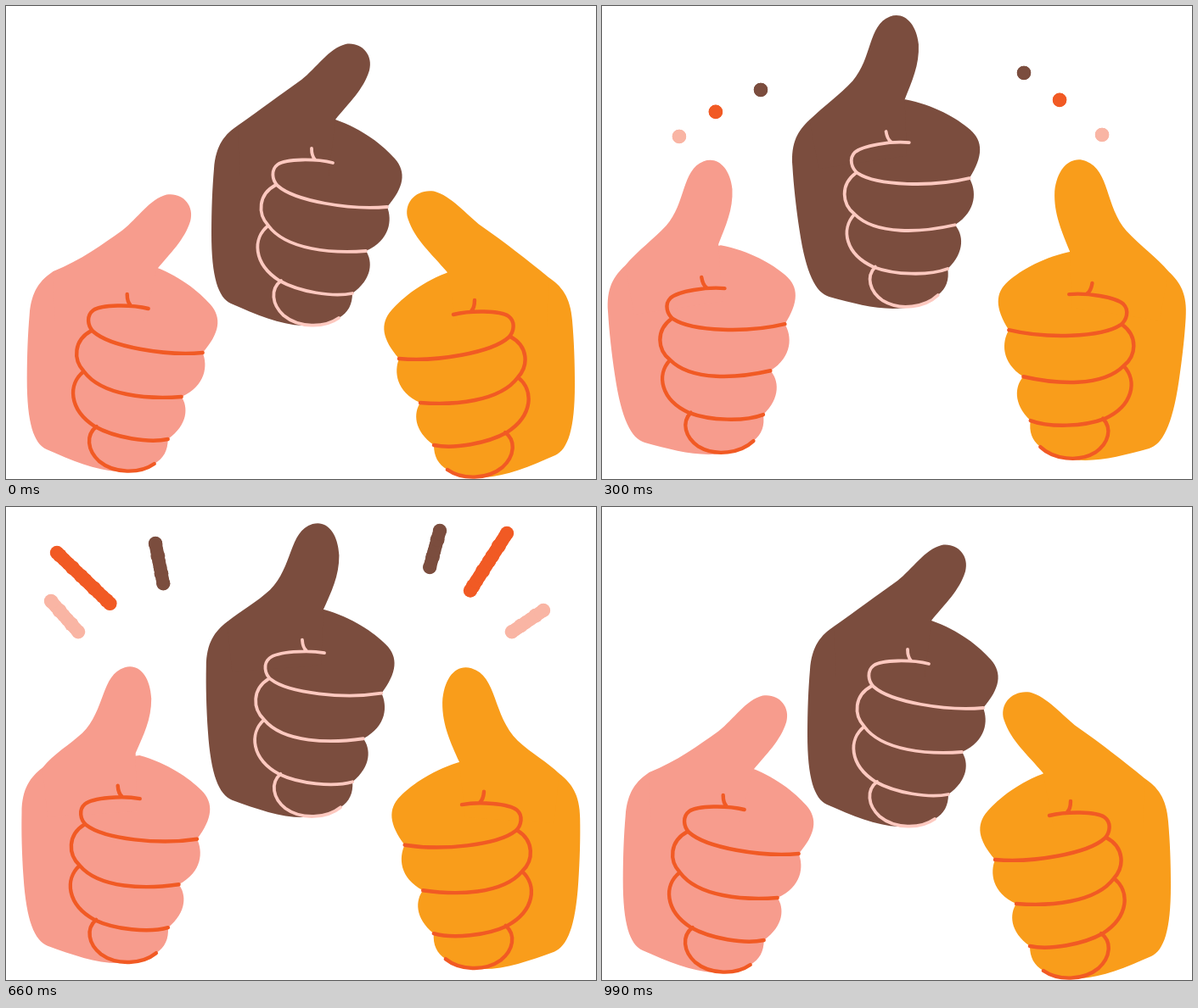
These frames come from a looping animation (695x558 px, 1110 ms). An HTML page with a canvas:

```html
<!DOCTYPE html>
<html lang="en">
<head>
<meta charset="utf-8">
<title>Thumbs up</title>
<style>
html, body { margin: 0; width: 100%; height: 100%; overflow: hidden; background: #fff; }
canvas { display: block; }
</style>
</head>
<body>
<canvas id="stage" width="695" height="558"></canvas>
<script>
const ctx = document.getElementById('stage').getContext('2d');
const LOOP = 1110, STEP = 30;
const PIVOT = [212.4, 329.7], TILT = 11 * Math.PI / 180;
const BROWN = '#7b4d3e', ORANGE = '#f15a24', SALMON = '#f79c8d', PEACH = '#f9b5a4';

const fist = new Path2D(`M388,134 C420,145 445,165 458,180 C472,196 469,214 449,237
  C455,252 453,276 424,289 C432,301 432,322 408,339 C408,352 403,362 392,368
  C380,377 362,378 350,377 C322,376 295,364 265,351 C250,344 242,320 242,268
  C242,240 243,215 245,192 C247,164 258,151 273,141 Z`);

const creases = new Path2D(`M360,168 C360,174 361,178 364,181
  M385,185 C365,180 330,180 320,187 C312,193 313,205 320,212 C340,230 405,241 449,237
  M318,211 C297,222 296,245 309,259 C330,288 385,292 424,289
  M309,259 C290,274 291,304 322,324 C345,337 385,344 408,339
  M324,324 C311,334 313,352 327,365 C345,380 375,380 392,368`);

// Bezier points from the knuckle over the tip to the web of the thumb
const bent = [[300, 122], [324, 104], [348, 87], [366, 73], [380, 50], [400, 45],
  [418, 42], [433, 57], [428, 76], [421, 99], [404, 114], [388, 134]];
const straight = [[289, 130], [306, 124], [320, 112], [352, 84], [345, 36], [376, 29],
  [392, 25], [404, 40], [405, 70], [405, 95], [396, 114], [387, 134]];

// from, to: thumb bend at rest and when raised; slide: sideways play of the thumb
const hands = [
  { x: 0, y: 0, flip: 1, fill: BROWN, line: '#fdc9c0', width: 3.8, from: 0, to: 1, size: 1, slide: 0 },
  { x: -217.3, y: 172, flip: 1, fill: SALMON, line: ORANGE, width: 4.4, from: 0, to: 1, size: 1, slide: 6.5 },
  { x: 912, y: 179, flip: -1, fill: '#f99d1b', line: ORANGE, width: 4.4, from: -0.1, to: 1.05, size: 1.09, slide: 0 }
];

const rays = [
  [PEACH, 91, 154, 53, 111], [ORANGE, 134, 125, 60, 54], [BROWN, 187, 99, 176, 43],
  [BROWN, 497, 79, 511, 28], [ORANGE, 539, 111, 590, 31], [PEACH, 589, 152, 633, 122]
];

const lerp = (a, b, u) => a + (b - a) * u;
const span = (t, a, b) => Math.min(1, Math.max(0, (t - a) / (b - a)));
const sine = u => (1 - Math.cos(Math.PI * u)) / 2;
const cubic = u => u < 0.5 ? 4 * u ** 3 : 1 - 4 * (1 - u) ** 3;

function drawThumb(h, raise) {
  const u = lerp(h.from, h.to, raise), shift = h.slide * (1 - 2 * raise);
  const p = bent.map(([x, y], i) => [
    lerp(340, lerp(x, straight[i][0], u), h.size) + shift,
    lerp(125, lerp(y, straight[i][1], u), h.size) + shift * 0.85
  ]);
  ctx.beginPath();
  ctx.moveTo(273, 141);
  for (let i = 0; i < p.length; i += 3) ctx.bezierCurveTo(...p[i], ...p[i + 1], ...p[i + 2]);
  ctx.lineTo(380, 200);
  ctx.lineTo(275, 200);
  ctx.fill();
}

function drawHand(h, lift, raise, dy) {
  ctx.save();
  ctx.translate(h.x, h.y + dy);
  ctx.scale(h.flip, 1);
  ctx.translate(...PIVOT);
  ctx.rotate(-TILT * lift);
  ctx.translate(-PIVOT[0], -PIVOT[1]);
  ctx.fillStyle = h.fill;
  ctx.fill(fist);
  drawThumb(h, raise);
  ctx.strokeStyle = h.line;
  ctx.lineWidth = h.width;
  ctx.stroke(creases);
  ctx.restore();
}

// A line with a slightly lumpy edge
function drawRay([color, x0, y0, x1, y1], tail, head) {
  const len = Math.hypot(x1 - x0, y1 - y0);
  const at = u => [lerp(x0, x1, u), lerp(y0, y1, u)];
  const dot = (u, r) => {
    ctx.beginPath();
    ctx.arc(...at(u), r, 0, 7);
    ctx.fill();
  };
  ctx.fillStyle = ctx.strokeStyle = color;
  ctx.lineWidth = 15.4;
  ctx.beginPath();
  ctx.moveTo(...at(tail));
  ctx.lineTo(...at(head));
  ctx.stroke();
  dot(tail, 8.2);
  dot(head, 8.2);
  for (let i = 1; i * 7 < len; i++) {
    const u = i * 7 / len;
    if (u > tail && u < head) dot(u, 8 + 0.5 * Math.sin(i * 2.4));
  }
}

function draw(t) {
  const fall = sine(span(t, 540, 740));
  const lift = sine(span(t, 0, 440)) - fall;
  const raise = cubic(span(t, 0, 540)) - sine(span(t, 540, 930));
  ctx.clearRect(0, 0, 695, 558);
  ctx.lineCap = ctx.lineJoin = 'round';
  for (const h of hands) drawHand(h, lift, raise, -8 * fall * (1 - fall));
  if (t >= 300 && t < 870) {
    const head = sine(span(t, 290, 590)), tail = sine(span(t, 590, 860));
    for (const r of rays) drawRay(r, tail, head);
  }
}

const start = performance.now();
function tick() {
  const t = (performance.now() - start) % LOOP;
  draw(Math.min(990, Math.floor(t / STEP) * STEP));
  requestAnimationFrame(tick);
}
tick();
</script>
</body>
</html>
```
